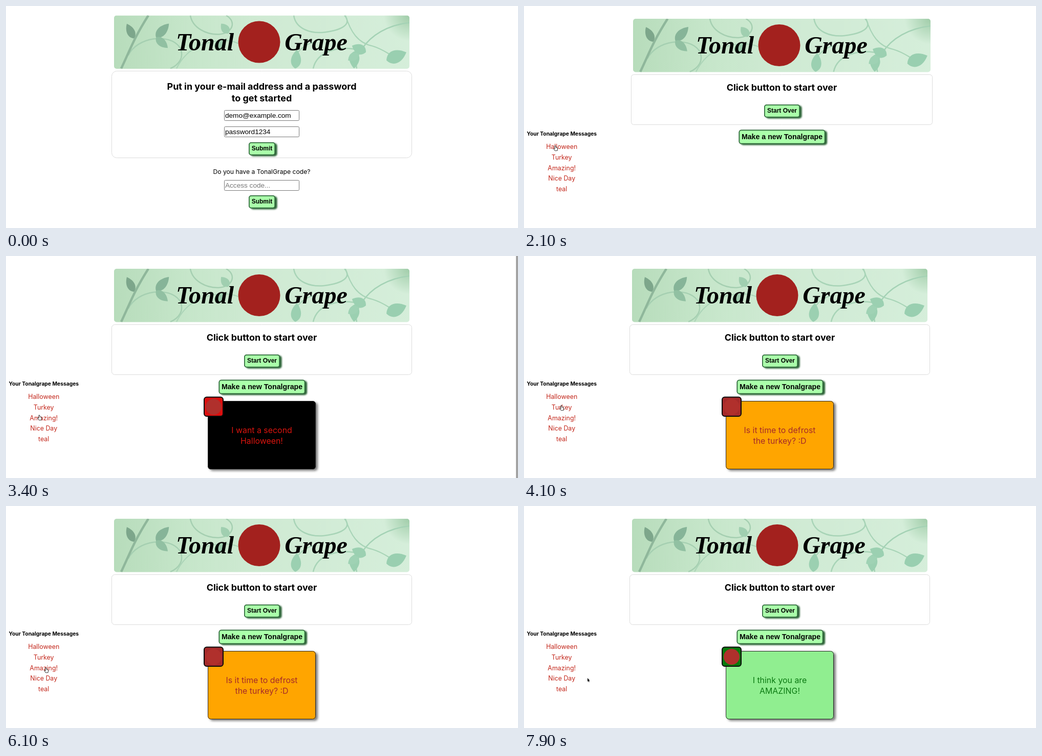
An HTML page with a canvas that plays this animation: 1000 by 435 pixels, repeating every 8 s.

```html
<!DOCTYPE html>
<html lang="en">
<head>
<meta charset="utf-8">
<title>Tonal Grape</title>
<style>
html, body { margin: 0; width: 100%; height: 100%; overflow: hidden; background: #fff; }
canvas { display: block; width: 1000px; height: 435px; }
</style>
</head>
<body>
<canvas id="stage" width="1000" height="435"></canvas>
<script>
const ctx = document.getElementById('stage').getContext('2d');
const LOOP = 8000, STEP = 100;
const UI = 'Inter, sans-serif';
const ARIAL = '"Liberation Sans", Arial, sans-serif';
const SCRIPT = 'italic bold 48px "Liberation Serif", serif';
const HEAD = `bold 17.9px ${UI}`;

const LINKS = ['Halloween', 'Turkey', 'Amazing!', 'Nice Day', 'teal'];
const CARDS = [
  { at: 2300, bg: '#000', ink: '#d9140e', badge: '#dc0f0f', lines: ['I want a second', 'Halloween!'] },
  { at: 4000, bg: '#ffa500', ink: '#a52a2a', badge: '#a52a2a', lines: ['Is it time to defrost', 'the turkey? :D'] },
  { at: 6300, bg: '#90ee90', ink: '#0b7a12', badge: '#087a0c', lines: ['I think you are', 'AMAZING!'] }
];

// Pointer stops: time, x, y
const POINTER = [
  [300, 575, 352], [700, 517, 281], [1300, 517, 281], [1500, 200, 361], [1600, 150, 358],
  [1700, 150, 358], [2100, 62, 279], [2800, 62, 279], [3400, 66, 317], [3600, 66, 317],
  [3900, 74, 298], [4800, 74, 298], [5300, 160, 343], [5700, 112, 336], [6100, 79, 322],
  [6400, 79, 322], [6600, 88, 326], [6700, 88, 326], [7000, 150, 350], [7600, 150, 350],
  [7900, 126, 341]
];

// Banner artwork, relative to the banner's corner
const VINES = [
  ['M28 78C45 42 108 34 128 62C139 82 126 97 110 104', 2.5, '#a5cfb1'],
  ['M149 0C153 24 180 38 205 37C232 35 240 12 219 0', 2.5, '#a5cfb1'],
  ['M122 104C140 68 170 50 218 49C235 50 246 55 254 62', 2.2, '#acd5b8'],
  ['M351 0C355 27 385 36 411 33C450 28 464 15 450 0', 2.5, '#a8d4b7'],
  ['M577 14C535 19 502 38 484 66C472 84 472 94 474 104', 2.5, '#a4d2b5'],
  ['M389 104C396 70 440 58 480 68', 2.5, '#a8d4b7'],
  ['M452 0C462 32 476 54 505 60C525 66 535 75 545 80', 2.2, '#a8d4b7'],
  ['M354 80C362 66 374 56 392 52', 2.2, '#a8d4b7'],
  ['M14 104C32 66 38 46 67 0', 4.5, '#8fb79b']
].map(([d, w, c]) => [new Path2D(d), w, c]);

// Leaves: base x, base y, length, angle, half width, shade
const LEAVES = [
  [39, 45, 32, -116, 8, '#7da68b'], [82, 43, 37, -47, 9, '#86b498'],
  [82, 43, 31, 42, 8, '#91c0a2'], [224, 35, 24, -128, 8, '#a0cfb0'],
  [196, 61, 24, -22, 8, '#9bcbac'], [492, 72, 30, -155, 10, '#9bd0b1'],
  [470, 70, 34, 92, 10, '#9bd0b1'], [532, 88, 42, -22, 13, '#99cfb0'],
  [354, 104, 37, -85, 10, '#9bd0b1'], [476, 75, 23, 145, 8, '#9fd2b4']
];

function text(str, x, y, font, color = '#000', align = 'center') {
  ctx.font = font;
  ctx.fillStyle = color;
  ctx.textAlign = align;
  ctx.fillText(str, x, y);
}

function box(x, y, w, h, r, fill, stroke, line = 1) {
  ctx.beginPath();
  ctx.roundRect(x, y, w, h, r);
  if (fill) { ctx.fillStyle = fill; ctx.fill(); }
  if (stroke) { ctx.strokeStyle = stroke; ctx.lineWidth = line; ctx.stroke(); }
}

function disc(x, y, r, color) {
  ctx.beginPath();
  ctx.arc(x, y, r, 0, 2 * Math.PI);
  ctx.fillStyle = color;
  ctx.fill();
}

function shadowed(color, dx, dy, blur, draw) {
  ctx.save();
  ctx.shadowColor = color;
  ctx.shadowOffsetX = dx;
  ctx.shadowOffsetY = dy;
  ctx.shadowBlur = blur;
  draw();
  ctx.restore();
}

function button(label, cx, y, w, h, size) {
  const x = cx - w / 2;
  shadowed('#2c6437', 3.6, 2, 3, () => box(x, y, w, h, 5, '#356f40'));
  box(x + 1, y + 1, w - 2, h - 2, 4, '#aaffaa', '#356f40', 1.6);
  text(label, cx, y + h / 2 + size * 0.3, `bold ${size}px ${ARIAL}`);
}

function input(value, y, color = '#000') {
  box(426.5, y + 0.5, 146, 20, 2, '#fff', '#777');
  text(value, 428, y + 15, `13.6px ${ARIAL}`, color, 'left');
}

function leaf(x, y, len, deg, half, color) {
  ctx.save();
  ctx.translate(x, y);
  ctx.rotate(deg * Math.PI / 180);
  ctx.beginPath();
  ctx.moveTo(0, 0);
  ctx.bezierCurveTo(len * 0.2, -half * 1.4, len * 0.65, -half * 1.2, len, 0);
  ctx.bezierCurveTo(len * 0.65, half * 1.2, len * 0.2, half * 1.4, 0, 0);
  ctx.fillStyle = color;
  ctx.fill();
  ctx.restore();
}

function banner(x, y, w, cx) {
  ctx.save();
  ctx.translate(x, y);
  ctx.scale(w / 577, 1);
  ctx.beginPath();
  ctx.roundRect(0, 0, 577, 104.5, 5);
  ctx.clip();
  const base = ctx.createLinearGradient(0, 0, 577, 0);
  base.addColorStop(0, '#b7dcbb');
  base.addColorStop(0.25, '#c6e6ca');
  base.addColorStop(0.5, '#cfead3');
  base.addColorStop(1, '#d5eeda');
  ctx.fillStyle = base;
  ctx.fillRect(0, 0, 577, 105);
  const corner = ctx.createRadialGradient(577, 0, 0, 577, 0, 50);
  corner.addColorStop(0, '#9fcca8');
  corner.addColorStop(1, '#9fcca800');
  ctx.fillStyle = corner;
  ctx.fillRect(0, 0, 577, 105);
  for (const [path, width, color] of VINES) {
    ctx.lineWidth = width;
    ctx.strokeStyle = color;
    ctx.stroke(path);
  }
  LEAVES.forEach(l => leaf(...l));
  ctx.restore();
  text('Tonal', cx - 111, y + 68, SCRIPT);
  text('Grape', cx + 106, y + 68, SCRIPT);
  disc(cx - 5, y + 52, 41, '#a3211e');
}

function form() {
  banner(211, 18.5, 577, 499.5);
  box(206.5, 127.5, 586, 170, 10, '#fff', '#dcdcdc');
  text('Put in your e-mail address and a password', 499.5, 164, HEAD);
  text('to get started', 499.5, 187, HEAD);
  input('demo@example.com', 204);
  input('password1234', 236);
  button('Submit', 500, 267, 52, 25.5, 12);
  text('Do you have a TonalGrape code?', 499.5, 328.5, `12.2px ${UI}`);
  input('Access code...', 341, '#777');
  button('Submit', 500, 371, 52, 25.5, 12);
}

function messages() {
  text('Your Tonalgrape Messages', 5.5, 254, `bold 10.3px ${UI}`, '#000', 'left');
  LINKS.forEach((name, i) =>
    text(name, 73.7, 280.4 + i * 20.6, `12.4px ${UI}`, '#c3271b'));
}

function card({ bg, ink, badge, lines }) {
  shadowed('rgba(0,0,0,.5)', 4, 3, 4, () => box(394, 284, 211, 134, 6, bg));
  box(394.5, 284.5, 210, 133, 6, null, '#222');
  lines.forEach((line, i) => text(line, 499.5, 347 + i * 21, `15.9px ${UI}`, ink));
  box(387, 276.5, 37, 37.5, 5, badge, '#0a0a0a', 2);
  disc(405.5, 295.5, 15.5, '#b0302c');
}

function home(t) {
  const shown = CARDS.filter(c => t >= c.at).pop();
  const cx = shown ? 499.5 : 503.5;
  if (shown) {
    banner(211, 25, 577, cx);
    box(206.5, 134.5, 586, 98, 6, '#fff', '#dcdcdc');
  } else {
    banner(213, 25, 581, cx);
    box(209.5, 134.5, 588, 98, 5, '#fff', '#dcdcdc');
  }
  text('Click button to start over', cx, 166, HEAD);
  button('Start Over', cx + 0.5, 193, 70, 25.5, 12);
  if (t >= 1000) {
    button('Make a new Tonalgrape', cx + 0.5, 242.5, 169, 28, 14.2);
    messages();
  }
  if (shown) card(shown);
  if (t >= 2300 && t < 4100) {
    ctx.globalAlpha = Math.min(1, (4100 - t) / 500);
    ctx.fillStyle = '#a3a3a3';
    ctx.fillRect(996, 0, 4, 435);
    ctx.globalAlpha = 1;
  }
}

function pointerAt(t) {
  const i = POINTER.findIndex(p => p[0] > t);
  if (i < 0) return POINTER[POINTER.length - 1].slice(1);
  const [t0, x0, y0] = POINTER[i - 1], [t1, x1, y1] = POINTER[i];
  const k = (t - t0) / (t1 - t0), e = k * k * (3 - 2 * k);
  return [x0 + (x1 - x0) * e, y0 + (y1 - y0) * e];
}

const ARROW = new Path2D('M-2-4L-2 3L-.5 1.7L.6 4.2L1.7 3.7L.7 1.4L2.7 1.2Z');
const HAND = new Path2D('M-1.6-4.5Q-.7-5-.4-4L.2-1.5L2.2-1Q3.4-.5 3.2 1L2.6 4L-.8 4.4L-3.4 1.2Q-3.4 0-2.2.5L-1.3 1.2Z');

function pointer(t) {
  if (t < 400) return;
  const [x, y] = pointerAt(t);
  const hand = (t >= 600 && t < 1400) || (x > 42 && x < 105 && y > 268 && y < 366);
  const shape = hand ? HAND : ARROW;
  ctx.save();
  ctx.translate(x, y);
  ctx.lineWidth = hand ? 1.7 : 0.9;
  ctx.fillStyle = hand ? '#fff' : '#111';
  ctx.strokeStyle = hand ? '#111' : '#fff';
  ctx.stroke(shape);
  ctx.fill(shape);
  ctx.restore();
}

function draw(now) {
  const t = Math.floor((now % LOOP) / STEP) * STEP;
  ctx.fillStyle = '#fff';
  ctx.fillRect(0, 0, 1000, 435);
  if (t < 900) form(); else home(t);
  pointer(t);
}

let start;
function tick(now) {
  start ??= now;
  draw(now - start);
  requestAnimationFrame(tick);
}
draw(0);
requestAnimationFrame(tick);
</script>
</body>
</html>
```
